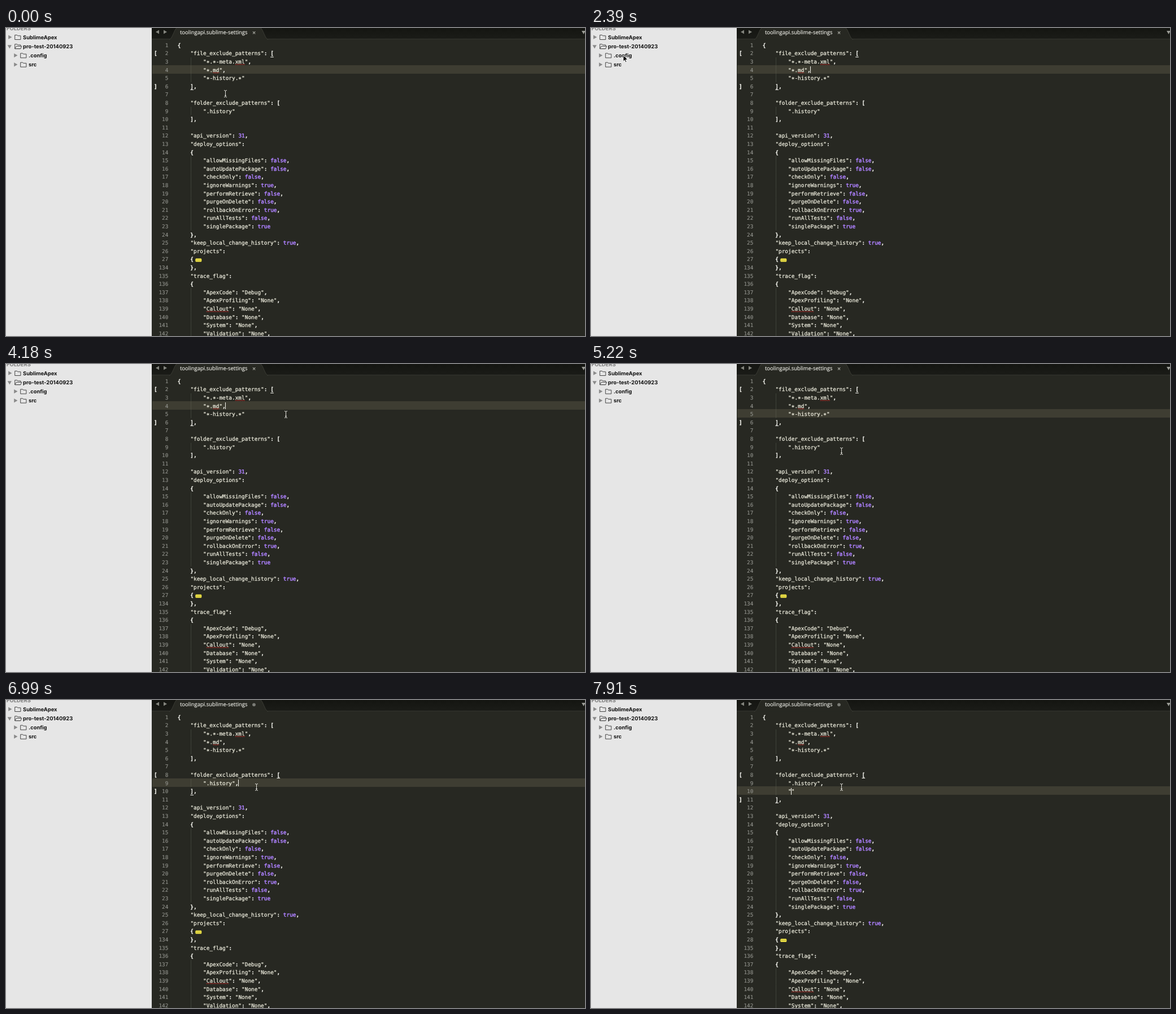
Animation, 1025 px wide and 546 px high, one loop 8000 ms. Source, as an HTML page with a canvas:

```html
<!DOCTYPE html>
<html lang="en">
<head>
<meta charset="utf-8">
<title>Editor</title>
<style>
  html, body { margin: 0; width: 100%; height: 100%; overflow: hidden; background: #272822; }
  canvas { display: block; }
</style>
</head>
<body>
<canvas id="stage" width="1025" height="546"></canvas>
<script>
const ctx = document.getElementById('stage').getContext('2d');
const LOOP = 8000, TICK = 148.6;
const SIDE = 258, WIDTH = 1025, HEIGHT = 546;
const ROW = 14.6, TOP = 22.9, TEXT_X = 303.7, CHAR = 5.671;
const MONO = '9.42px "DejaVu Sans Mono", monospace';
const BOLD = 'bold 9.4px Inter, sans-serif';
const CREAM = '#efeedf', WHITE = '#f8f8f2', PURPLE = '#ae81ff';

const SOURCE = `{
    "file_exclude_patterns": [
        "*.*-meta.xml",
        "*.md",
        "*-history.*"
    ],

    "folder_exclude_patterns": [
        ".history"
    ],

    "api_version": 31,
    "deploy_options":
    {
        "allowMissingFiles": false,
        "autoUpdatePackage": false,
        "checkOnly": false,
        "ignoreWarnings": true,
        "performRetrieve": false,
        "purgeOnDelete": false,
        "rollbackOnError": true,
        "runAllTests": false,
        "singlePackage": true
    },
    "keep_local_change_history": true,
    "projects":
    {
    },
    "trace_flag":
    {
        "ApexCode": "Debug",
        "ApexProfiling": "None",
        "Callout": "None",
        "Database": "None",
        "System": "None",
        "Validation": "None",`.split('\n');

const STOPS = [
  { at: 2, x: 388, y: 117 }, { at: 5, x: 103, y: 88 },
  { at: 9, x: 66, y: 59 }, { at: 12, x: 13, y: 44 },
  { at: 16, x: 57, y: 48 }, { at: 18, x: 3, y: 29 },
  { at: 22, x: 3, y: 29 }, { at: 28, x: 495, y: 90 },
  { at: 32, x: 495, y: 90 }, { at: 34, x: 450, y: 171 },
  { at: 35, x: 443, y: 155 }
];

// The caret sits at the end of its row, or "back" characters before it.
const INDENT = ' '.repeat(8);
const EDITS = [
  { at: -5.35, row: 4 },
  { at: 29, row: 5 },
  { at: 37, row: 9 },
  { at: 47, row: 9, comma: true },
  { at: 49, row: 10, comma: true, added: INDENT },
  { at: 52, row: 10, comma: true, added: INDENT + '""', back: 1 }
];

const rowTop = row => TOP + (row - 1) * ROW;
const baseline = row => rowTop(row) + 10.9;
const colX = col => TEXT_X + col * CHAR;
const clamp = v => Math.min(1, Math.max(0, v));
const smooth = p => p * p * (3 - 2 * p);

function box(color, x, y, w, h) {
  ctx.fillStyle = color;
  ctx.fillRect(x, y, w, h);
}

function shape(points, fill, stroke) {
  ctx.beginPath();
  for (const [x, y] of points) ctx.lineTo(x, y);
  ctx.closePath();
  ctx.lineWidth = 1;
  if (fill) { ctx.fillStyle = fill; ctx.fill(); }
  if (stroke) { ctx.strokeStyle = stroke; ctx.stroke(); }
}

function dot(color, x, y, r) {
  ctx.fillStyle = color;
  ctx.beginPath();
  ctx.arc(x, y, r, 0, 2 * Math.PI);
  ctx.fill();
}

function label(text, x, y, font, color, weight = 0, align = 'left') {
  ctx.font = font;
  ctx.textAlign = align;
  ctx.fillStyle = ctx.strokeStyle = color;
  ctx.fillText(text, x, y);
  if (!weight) return;
  ctx.lineWidth = weight;
  ctx.strokeText(text, x, y);
}

// A triangle pointing along the given angle.
function triangle(x, y, size, angle, color) {
  const corner = turn => [x + size * Math.cos(angle + turn), y + size * Math.sin(angle + turn)];
  shape([0, 2.1, -2.1].map(corner), color);
}

function folder(x, y, open) {
  shape([[x, y + 4], [x, y - 4], [x + 4, y - 4], [x + 5, y - 2.7], [x + 10.2, y - 2.7], [x + 10.2, y + 4]], null, '#444');
  if (open) shape([[x, y + 4], [x + 2.6, y - .4], [x + 12.2, y - .4], [x + 10, y + 4]], '#e6e6e6', '#444');
}

function sidebar() {
  box('#e6e6e6', 0, 0, SIDE, HEIGHT);
  label('FOLDERS', 1, 4.2, BOLD, '#7d7d7d');
  ['SublimeApex', 'pro-test-20140923', '.config', 'src'].forEach((name, i) => {
    const indent = i < 2 ? 0 : 10, y = 16.2 + i * 16.2, open = i === 1;
    triangle(6.3 + indent, y, 4.2, open ? Math.PI / 2 : 0, '#8a8a8a');
    folder(15.7 + indent, y + .3, open);
    label(name, 30 + indent, y + 3.4, BOLD, '#111');
  });
}

function tabBar(modified) {
  const shade = ctx.createLinearGradient(0, 0, 0, 20);
  shade.addColorStop(0, '#141511');
  shade.addColorStop(1, '#1b1c18');
  box(shade, SIDE, 0, WIDTH - SIDE, 20);
  box('#34352f', SIDE, 19, WIDTH - SIDE, 1);
  ctx.beginPath();
  ctx.moveTo(289, 20.5);
  ctx.bezierCurveTo(295, 19, 297, 3, 303, -1);
  ctx.lineTo(450, -1);
  ctx.bezierCurveTo(456, 3, 458, 19, 464, 20.5);
  ctx.fillStyle = '#272822';
  ctx.fill();
  ctx.strokeStyle = '#3b3c35';
  ctx.lineWidth = 1;
  ctx.stroke();
  triangle(269, 7, 4, Math.PI, '#85867f');
  triangle(281, 7, 4, 0, '#85867f');
  triangle(1022.5, 7, 4, Math.PI / 2, '#9a9b95');
  label('toolingapi.sublime-settings', 308, 11.4, '9.5px "Open Sans", sans-serif', '#e4e4de', .2);
  if (modified) dot('#7b7c76', 439, 8.3, 2.9);
  else label('×', 439, 11.8, '10px "Open Sans", sans-serif', '#a5a69f', .4, 'center');
}

function squiggle(lines, word) {
  const i = lines.findIndex(line => line.includes(word));
  const col = lines[i].indexOf(word), y = rowTop(i + 1) + 12.6;
  ctx.beginPath();
  for (let x = colX(col); x <= colX(col + word.length); x += .5) ctx.lineTo(x, y + .6 * Math.sin(x * 2));
  ctx.strokeStyle = '#c9302c';
  ctx.lineWidth = 1;
  ctx.stroke();
}

function codeLine(line, row) {
  let col = 0;
  for (const part of line.split(/("[^"]*"|\btrue\b|\bfalse\b|\b\d+\b)/)) {
    const quoted = part.startsWith('"');
    const color = quoted ? CREAM : /^\w/.test(part) ? PURPLE : WHITE;
    // The operator form of the asterisk sits at mid-height.
    label(part.replaceAll('*', '∗'), colX(col), baseline(row), MONO, color, quoted ? .25 : .5);
    col += part.length;
  }
}

function brackets(lines, row) {
  const opening = lines.findLastIndex((line, i) => i < row && line.includes('['));
  const closing = lines.findIndex((line, i) => i >= row && line.includes(']'));
  for (const [i, mark] of [[opening, '['], [closing, ']']]) {
    label(mark, 262, baseline(i + 1), MONO, WHITE, .6);
    box(WHITE, colX(lines[i].indexOf(mark)), Math.floor(rowTop(i + 1) + 13.8), CHAR, 1);
  }
}

function foldMark(row) {
  const y = rowTop(row) + 9;
  ctx.fillStyle = '#efe345';
  ctx.beginPath();
  ctx.roundRect(335.3, y - 2.9, 11, 5.8, 1.5);
  ctx.fill();
  for (let i = -1; i <= 1; i++) dot('#8d8630', 340.8 + i * 2.8, y, .8);
}

function editor(tick) {
  const edit = EDITS.findLast(e => e.at <= tick);
  const lines = SOURCE.slice();
  if (edit.comma) lines[8] += ',';
  if (edit.added) lines.splice(9, 0, edit.added);
  const fold = lines.findIndex(line => line.includes('"projects"')) + 2;

  box('#272822', SIDE, 0, WIDTH - SIDE, HEIGHT);
  tabBar(edit.comma);
  box('#3e3d32', SIDE + 1, Math.floor(rowTop(edit.row) - .6), WIDTH - SIDE, 15);

  lines.forEach((line, i) => {
    const row = i + 1;
    if (line.startsWith(INDENT)) box('rgba(110,111,98,.35)', Math.ceil(colX(4)), rowTop(row), 1, ROW);
    label(row > fold ? row + 106 : row, 287.4, baseline(row), MONO, '#8f908a', .15, 'right');
    codeLine(line, row);
  });
  brackets(lines, edit.row);
  for (const word of ['xml', 'md', 'Callout']) squiggle(lines, word);
  foldMark(fold);

  const col = lines[edit.row - 1].length - (edit.back || 0);
  const blink = (tick - edit.at + .3) / 6.66;
  ctx.globalAlpha = clamp(.5 + 3 * Math.sin(2 * Math.PI * blink));
  box(WHITE, Math.floor(colX(col)), Math.round(rowTop(edit.row) + 1.3), 1, 12);
  ctx.globalAlpha = 1;
}

function pointerAt(tick) {
  const next = STOPS.findIndex(s => s.at > tick);
  if (next < 1) return next ? STOPS.at(-1) : STOPS[0];
  const a = STOPS[next - 1], b = STOPS[next];
  const p = smooth((tick - a.at) / (b.at - a.at));
  return { x: a.x + (b.x - a.x) * p, y: a.y + (b.y - a.y) * p };
}

function pointer(tick) {
  const { x, y } = pointerAt(tick);
  ctx.save();
  ctx.translate(Math.round(x), Math.round(y));
  if (x < SIDE) {
    shape([[0, 0], [0, 11.4], [2.6, 9], [4.3, 13], [6.2, 12.2], [4.5, 8.3], [8, 8.1]], '#000', '#fff');
  } else {
    ctx.translate(.5, -.5);
    ctx.strokeStyle = '#deded8';
    ctx.lineWidth = 1;
    ctx.beginPath();
    for (const end of [-6, 6]) {
      ctx.moveTo(-2.5, end);
      ctx.quadraticCurveTo(0, end, 0, end * .75);
      ctx.quadraticCurveTo(0, end, 2.5, end);
    }
    ctx.moveTo(0, -5); ctx.lineTo(0, 5);
    ctx.moveTo(-1.5, 3); ctx.lineTo(1.5, 3);
    ctx.stroke();
  }
  ctx.restore();
}

function draw(now) {
  const tick = Math.floor(now % LOOP / TICK);
  ctx.textRendering = 'geometricPrecision';
  ctx.lineJoin = 'round';
  editor(tick);
  sidebar();
  pointer(tick);
  requestAnimationFrame(draw);
}
requestAnimationFrame(draw);
</script>
</body>
</html>
```
